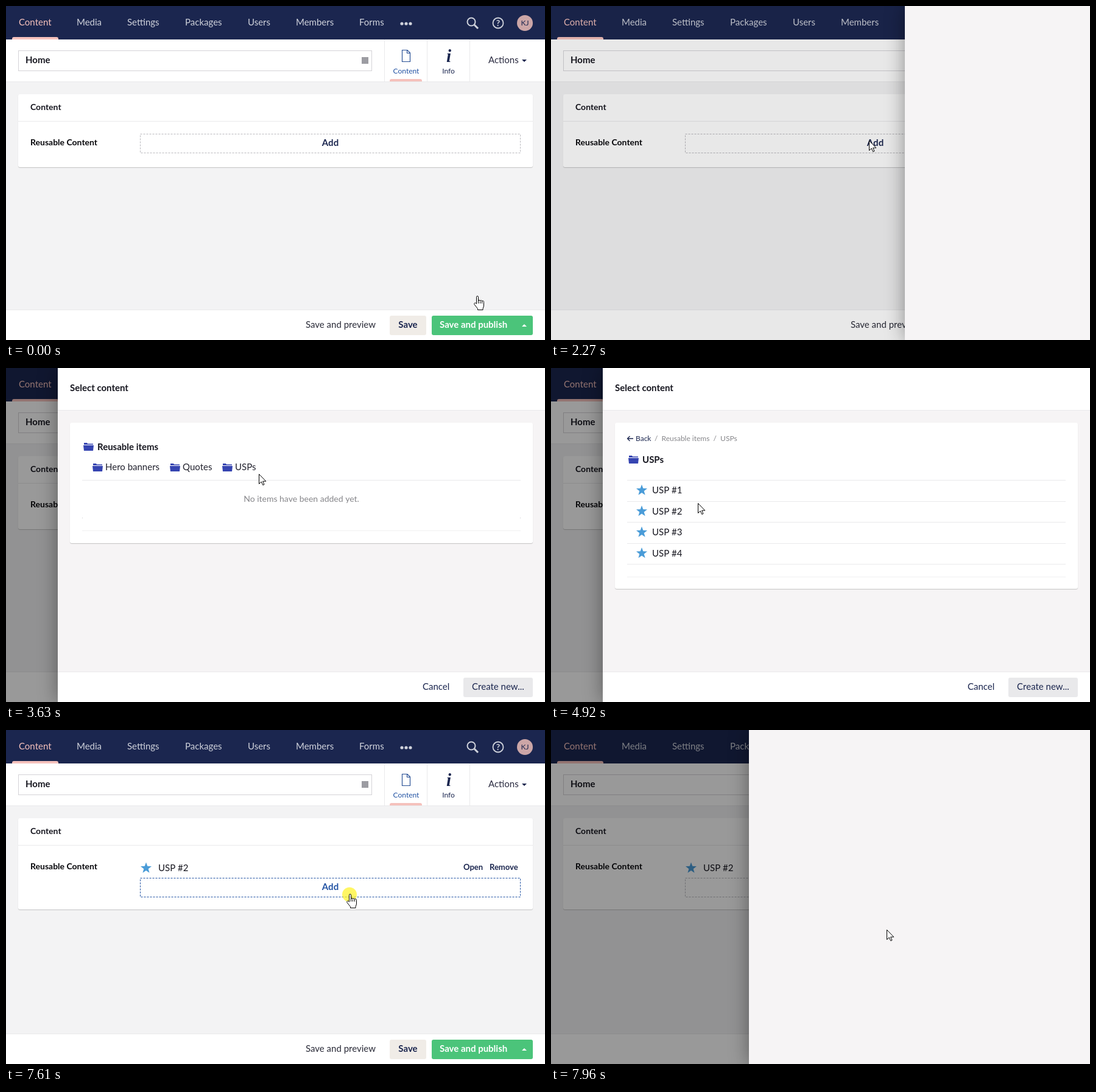
These frames come from a looping animation (885x549 px, 8 s). An HTML page with a canvas:

```html
<!DOCTYPE html>
<html lang="en">
<head>
<meta charset="utf-8">
<title>Reusable content picker</title>
<style>
html, body { margin: 0; width: 100%; height: 100%; overflow: hidden; background: #f3f3f4; }
canvas { display: block; }
</style>
</head>
<body>
<canvas id="stage" width="885" height="549"></canvas>
<script>
const W = 885, H = 549, LOOP = 8000;
const g = document.getElementById('stage').getContext('2d');

const NAVY = '#1b264f', PINK = '#f5c1bc', INK = '#16161f', BLUE = '#3544b1';
const LINE = '#e9e9eb', PALE = '#d0d3dc', LINK = '#2152a3';

// Cursor moves: start, end, number of steps, then evenly timed points.
const START = [773, 477];
const MOVES = [
  [70, 120, 2, [668, 373]],
  [450, 530, 2, [657, 378]],
  [790, 1470, 11, [620, 358], [565, 325], [533, 293], [525, 262], [523, 232], [526, 208]],
  [1610, 1800, 4, [522, 221]],
  [2550, 2680, 3, [516, 211]],
  [3280, 3900, 10, [490, 203], [450, 188], [415, 174], [402, 162], [397, 154]],
  [4100, 4100, 1, [404, 165]],
  [4630, 4990, 6, [310, 205], [207, 230]],
  [5190, 5330, 3, [207, 246]],
  [5800, 5930, 3, [278, 326]],
  [6790, 7540, 11, [340, 328], [430, 327], [505, 324], [570, 316], [574, 292], [564, 270]],
  [7740, 7960, 4, [551, 328]]
];
const CLICKS = [[2150, 2210], [4040, 4100], [5530, 5600], [7610, 7670]];
const FOLDER_OPEN = 4100, PICKED = 5600;

const ARROW = new Path2D('M.5.5V16.5L4.2 13L6.8 18.5L9 17.5L6.6 12.2H11.8Z');
const HAND = new Path2D('M4.5 13.5V2.3a1.5 1.5 0 0 1 3 0V9a1.5 1.5 0 0 1 3 0a1.5 1.5 0 0 1 3 .8' +
  'a1.4 1.4 0 0 1 3 .8V16q0 2-1 4l-.5 1.5V23.5H6.5V21.5L1.2 14.8a1.6 1.6 0 0 1 2.3-2.3z');
const KNUCKLES = new Path2D('M7.5 9V13M10.5 9.5V13M13.5 10V13');

const clamp = v => Math.min(1, Math.max(0, v));
const easeOut = v => 1 - (1 - clamp(v)) ** 3;
const inside = ([px, py], x, y, w, h) => px >= x && px <= x + w && py >= y && py <= y + h;

function rect(x, y, w, h, fill, r = 0) {
  g.fillStyle = fill;
  g.beginPath();
  g.roundRect(x, y, w, h, r);
  g.fill();
}

function disc(x, y, r, fill) {
  g.fillStyle = fill;
  g.beginPath();
  g.arc(x, y, r, 0, 7);
  g.fill();
}

function poly(points, fill) {
  g.fillStyle = fill;
  g.beginPath();
  points.forEach(p => g.lineTo(...p));
  g.fill();
}

function text(s, x, y, fill, size = 15, weight = 400, align = 'left') {
  g.font = `${weight} ${size}px Lato, sans-serif`;
  g.textAlign = align;
  g.fillStyle = fill;
  g.fillText(s, x, y);
}

const bold = (s, x, y, fill, size = 15, align) => text(s, x, y, fill, size, 700, align);

function stroke(path, color, width) {
  g.strokeStyle = color;
  g.lineWidth = width;
  g.stroke(new Path2D(path));
}

function card(x, y, w, h) {
  g.save();
  g.shadowColor = 'rgba(0,0,0,.2)';
  g.shadowBlur = 1;
  g.shadowOffsetY = 1;
  rect(x, y, w, h, '#fff', 3);
  g.restore();
}

function star(x, y) {
  const pts = Array.from({ length: 10 }, (_, i) => {
    const a = -Math.PI / 2 + i * Math.PI / 5, r = i % 2 ? 3.9 : 9.5;
    return [x + r * Math.cos(a), y + r * Math.sin(a)];
  });
  poly(pts, '#4a9cd8');
}

function folder(x, y) {
  poly([[x + 1, y], [x + 6, y], [x + 7, y + 1.5], [x + 16, y + 1.5], [x + 16, y + 3], [x + 1, y + 3]], BLUE);
  poly([[x, y + 4], [x + 17, y + 4], [x + 16, y + 13], [x + 1, y + 13]], BLUE);
}

function topBar() {
  rect(0, 0, W, 55, NAVY);
  text('Content', 21, 32, PINK);
  rect(10, 51, 76, 4, PINK, [3, 3, 0, 0]);
  [['Media', 116], ['Settings', 199], ['Packages', 294], ['Users', 397], ['Members', 476], ['Forms', 580]]
    .forEach(([s, x]) => text(s, x, 32, PALE));
  [650, 657, 664].forEach(x => disc(x, 29, 2.6, PALE));
  stroke('M770.5 26a6.5 6.5 0 1 1-13 0a6.5 6.5 0 1 1 13 0', PALE, 2);
  stroke('M769 31L775 37', PALE, 3);
  stroke('M816.5 28a8.5 8.5 0 1 1-17 0a8.5 8.5 0 1 1 17 0', PALE, 1.8);
  bold('?', 808, 33, PALE, 14, 'center');
  disc(852, 28, 13, '#cca6a7');
  text('KJ', 852, 32, NAVY, 12, 400, 'center');
}

function editorHeader() {
  rect(0, 55, W, 69, '#fff');
  rect(0, 124, W, 1, LINE);
  g.strokeStyle = '#d4d3d7';
  g.lineWidth = 1;
  g.strokeRect(20.5, 73.5, 580, 33);
  bold('Home', 32, 94, INK);
  rect(584, 84, 11, 11, '#9c9ca2');
  [621, 691, 761].forEach(x => rect(x, 55, 1, 69, LINE));
  stroke('M650.5 72.5H659L663.5 77V91.5H650.5ZM658.5 72.5V77.5H663.5', '#2a5196', 1.2);
  text('Content', 657, 111, LINK, 12, 400, 'center');
  rect(630, 120, 53, 4, PINK, [3, 3, 0, 0]);
  g.font = 'italic 700 29px "Liberation Serif", serif';
  g.fillStyle = NAVY;
  g.fillText('i', 727, 92);
  text('Info', 726.5, 111, NAVY, 12, 400, 'center');
  text('Actions', 792, 94, '#2a2b40');
  poly([[847, 88], [855, 88], [851, 92]], NAVY);
}

function addBox(y, color) {
  g.strokeStyle = color || '#b9b8bd';
  g.lineWidth = 1;
  g.setLineDash([3, 2]);
  g.strokeRect(220.5, y + .5, 624, 31);
  g.setLineDash([]);
  bold('Add', 532.5, y + 20, color || NAVY, 15, 'center');
}

function footer() {
  rect(0, 499, W, 1, LINE);
  rect(0, 500, W, 49, '#fff');
  text('Save and preview', 492, 529, '#2a2b38');
  rect(630, 509, 60, 32, '#f0ece7', 3);
  bold('Save', 660, 529, NAVY, 15, 'center');
  rect(699, 509, 166, 32, '#4bc47a', 3);
  bold('Save and publish', 712, 529, '#fff');
  poly([[847, 527], [855, 527], [851, 523]], '#fff');
}

function page(picked, hover) {
  rect(0, 0, W, H, '#f3f3f4');
  topBar();
  editorHeader();
  card(20, 145, 845, picked ? 150 : 120);
  rect(20, 189, 845, 1, LINE);
  bold('Content', 40, 171, INK, 14);
  bold('Reusable Content', 40, 229, '#08080c', 14);
  if (picked) {
    star(230, 227);
    text('USP #2', 250, 232, INK);
    bold('Open', 751, 230, NAVY, 13);
    bold('Remove', 794, 230, NAVY, 13);
  }
  addBox(picked ? 243 : 210, hover && (picked ? LINK : BLUE));
  footer();
}

function folderRoot() {
  folder(127, 123);
  bold('Reusable items', 150, 135, INK);
  [['Hero banners', 142], ['Quotes', 269], ['USPs', 355]].forEach(([s, x]) => {
    folder(x, 157);
    text(s, x + 21, 168, '#22222e');
  });
  rect(125, 184, 720, 1, LINE);
  text('No items have been added yet.', 485, 220, '#86868a', 14, 400, 'center');
  rect(125, 246, 1, 1, '#c8c8cc');
  rect(844, 246, 1, 1, '#c8c8cc');
  rect(125, 267, 720, 1, '#f0f0f1');
}

function folderItems() {
  stroke('M135 116H126M129.5 112L125.5 116L129.5 120', NAVY, 1.3);
  text('Back', 139, 120, NAVY, 12);
  text('/  Reusable items  /  USPs', 170, 120, '#86868a', 12);
  folder(127, 144);
  bold('USPs', 150, 156, INK);
  for (let i = 0; i < 4; i++) {
    const y = 184 + i * 34.5;
    rect(125, Math.round(y), 720, 1, LINE);
    star(149, y + 17);
    text('USP #' + (i + 1), 166, y + 22, INK);
  }
  rect(125, 322, 720, 1, LINE);
  rect(125, 343, 720, 1, '#f0f0f1');
}

function panel(left, loaded, opened) {
  g.save();
  g.shadowColor = 'rgba(0,0,0,.4)';
  g.shadowBlur = 30;
  rect(left, 0, W, H, '#f6f4f5');
  g.restore();
  if (!loaded) return;
  g.save();
  g.translate(left - 85, 0);
  rect(85, 0, 800, 69, '#fff');
  rect(85, 69, 800, 1, LINE);
  bold('Select content', 105, 38, INK);
  card(105, 90, 760, opened ? 273 : 198);
  (opened ? folderItems : folderRoot)();
  rect(85, 499, 800, 1, LINE);
  rect(85, 500, 800, 49, '#fff');
  text('Cancel', 684, 529, NAVY);
  rect(751, 509, 114, 32, '#e9e9eb', 3);
  text('Create new...', 808, 529, NAVY, 15, 400, 'center');
  g.restore();
}

function cursorAt(t) {
  let pos = START;
  for (const [from, to, steps, ...pts] of MOVES) {
    if (t < from) break;
    const last = pts[pts.length - 1];
    if (t >= to) { pos = last; continue; }
    const p = Math.floor((t - from) / (to - from) * (steps - 1) + 1) / steps;
    const path = [pos, ...pts], at = p * pts.length, i = Math.min(Math.floor(at), pts.length - 1);
    const [a, b] = [path[i], path[i + 1]];
    return a.map((v, k) => Math.round(v + (b[k] - v) * (at - i)));
  }
  return pos;
}

function drawCursor([x, y], hand) {
  g.save();
  g.translate(x - (hand ? 5 : 0), y - (hand ? 1 : 0));
  g.fillStyle = '#fff';
  g.strokeStyle = '#000';
  g.lineWidth = 1;
  const shape = hand ? HAND : ARROW;
  g.fill(shape);
  g.stroke(shape);
  if (hand) g.stroke(KNUCKLES);
  g.restore();
}

function draw(t) {
  const pos = cursorAt(t);
  const picked = t >= PICKED;
  const slideStart = picked ? 7690 : 2210;
  const open = t >= slideStart && (picked || t < PICKED);
  const opened = t >= FOLDER_OPEN;
  const overAdd = !open && inside(pos, 220, picked ? 243 : 210, 625, 32);

  page(picked, overAdd);

  let hand = overAdd || t < 70;
  if (open) {
    const u = (t - slideStart + 1) / 270;
    g.fillStyle = `rgba(0,0,0,${.4 * clamp(u)})`;
    g.fillRect(0, 0, W, H);
    const widen = picked ? 0 : clamp((t - 2485) / 195);
    const left = Math.round(885 - 560 * easeOut(u) - 240 * widen);
    panel(left, !picked && t >= 2620, opened);
    if (!picked) hand = opened ? inside(pos, 140, 219, 76, 34) : inside(pos, 355, 153, 57, 19);
  }

  if (CLICKS.some(([a, b]) => t >= a && t < b)) disc(pos[0], pos[1] + .5, 12, 'rgba(255,243,40,.72)');
  drawCursor(pos, hand);
}

const begin = performance.now();
function tick() {
  draw((performance.now() - begin) % LOOP);
  requestAnimationFrame(tick);
}
tick();
</script>
</body>
</html>
```
